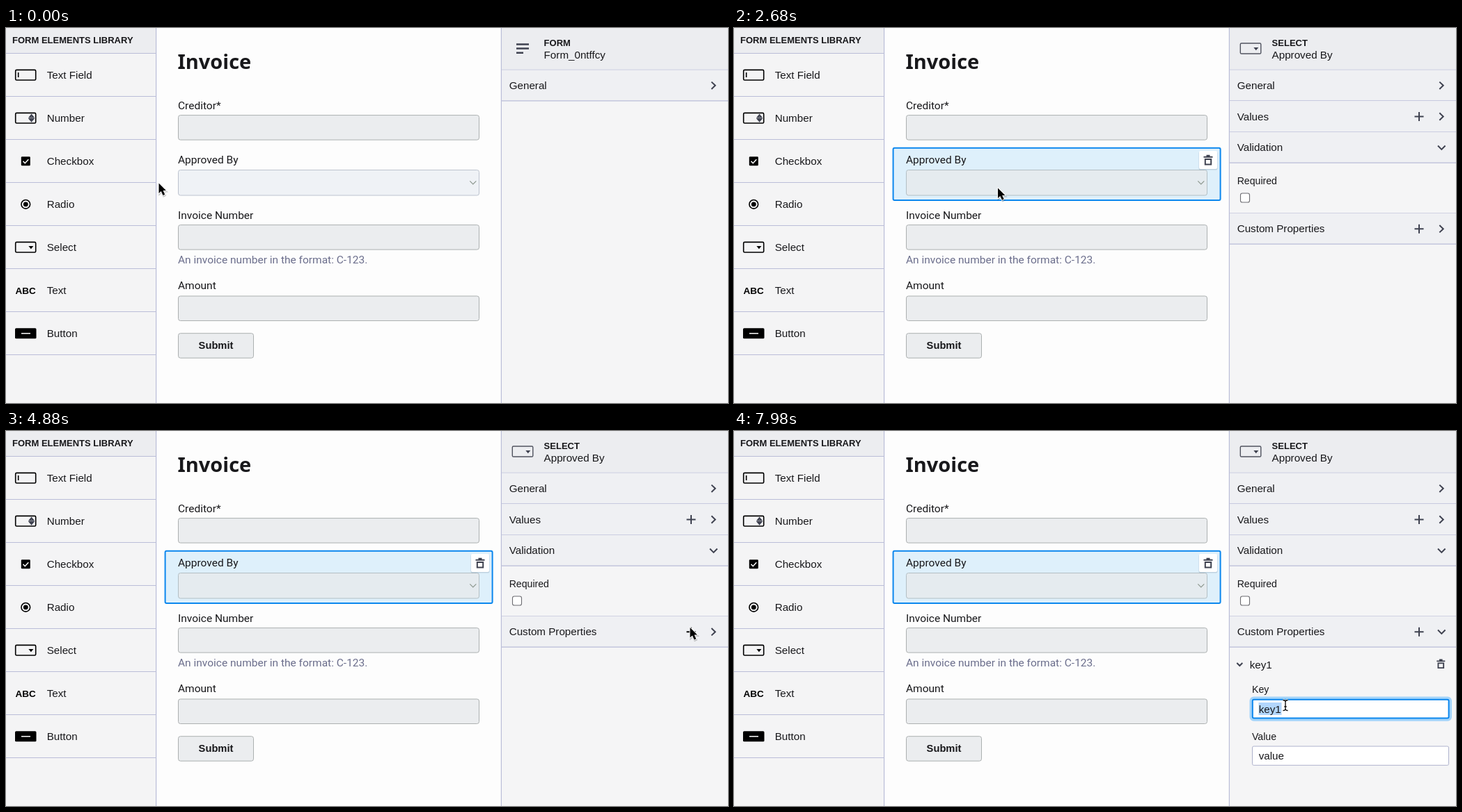
Write an HTML page that moves like this. It is 1037 px wide and 540 px high and loops after 8000 ms.

```html
<!DOCTYPE html>
<html lang="en">
<head>
<meta charset="utf-8">
<title>Form editor</title>
<style>
  html, body { margin: 0; width: 100%; height: 100%; overflow: hidden; background: #fdfdfd; }
  svg { display: block; width: 1037px; height: 540px; }
  text { font: 15.2px "Liberation Sans", Arial, sans-serif; fill: #18181b; white-space: pre; }
  .caps { font-size: 13px; font-weight: bold; }
  .small { font-size: 14.1px; }
  .label { font: 15.5px Roboto, sans-serif; }
  .help { fill: #6b6e8c; }
  .title { font: bold 29px "Noto Sans", sans-serif; }
  .submit { font-size: 14.7px; font-weight: bold; text-anchor: middle; }
  .abc { font-size: 13.5px; font-weight: bold; fill: #000; }
  .rule { stroke: #babdd8; stroke-width: 1.2; }
  .line { fill: none; stroke: #3f4250; stroke-width: 2; }
  .icon { fill: none; stroke: #000; stroke-width: 1.6; }
  .field { fill: #ebedef; stroke: #acb0b0; }
  .entry { fill: #fff; stroke: #aeb2cc; }
</style>
</head>
<body>
<svg id="stage" viewBox="0 0 1037 540"></svg>
<script>
const text = (x, y, content, cls = '') => `<text x="${x}" y="${y}" class="${cls}">${content}</text>`;
const box = (x, y, w, h, attrs = '') => `<rect x="${x}" y="${y}" width="${w}" height="${h}" ${attrs}/>`;
const path = (d, attrs = 'class="line"') => `<path d="${d}" ${attrs}/>`;
const rule = (x, y, w) => path(`M${x} ${y}h${w}`, 'class="rule"');
const group = (id, content) => `<g id="${id}">${content}</g>`;
const fill = color => `fill="${color}"`;

const right = y => path(`M1013.3 ${y - 5.2}l5.4 5.2l-5.4 5.2`);
const down = y => path(`M1011 ${y - 2.7}l5.3 5.4l5.3-5.4`);
const plus = (y, attrs) => path(`M977.5 ${y}h13M984 ${y - 6.5}v13`, attrs);
const trash = (x, y, s) => `<g transform="translate(${x} ${y}) scale(${s})">` +
  path('M-6.5-4.5h13M-2.5-6.5h5M-4.2-1.2h8.4v7.4h-8.4z') + '</g>';
const frame = y => box(13.7, y - 7.3, 29, 14.6, 'rx="1.6" class="icon"');

function section(y, name, extra) {
  return box(712, y, 325, 44.5, fill('#eff0f3')) + rule(712, y + 44.5, 325) +
    text(722.7, y + 27.7, name) + extra;
}

function library() {
  const names = ['Text Field', 'Number', 'Checkbox', 'Radio', 'Select', 'Text', 'Button'];
  const icons = [
    frame(67.7) + path('M17.7 64v7', 'class="icon"'),
    frame(129.7) + path('M34 128.4l2.6-3.2l2.6 3.2zM34 131l2.6 3.2l2.6-3.2z'),
    box(21.8, 185.3, 13, 13, 'rx="1.3"') +
      path('M24.5 191.8l2.8 2.9l5-5.4', 'fill="none" stroke="#fff" stroke-width="1.5"'),
    '<circle cx="28.3" cy="253.8" r="6.3" class="icon"/><circle cx="28.3" cy="253.8" r="3.4"/>',
    frame(315.7) + path('M32.4 314h7l-3.5 4.3z', ''),
    text(13.6, 382.6, 'ABC', 'abc'),
    box(13, 432.3, 30.5, 15, 'rx="1.6"') + path('M22 439.8h13', 'stroke="#fff" stroke-width="1.5"')
  ];
  return box(0, 0, 215, 540, fill('#f4f4f5')) + box(0, 0, 215, 36, fill('#ecedf0')) +
    text(9, 21.5, 'FORM ELEMENTS LIBRARY', 'caps') + rule(0, 36.5, 215) +
    names.map((name, i) => icons[i] + text(58.7, 73 + 62 * i, name) + rule(0, 98.5 + 62 * i, 215)).join('') +
    path('M215.6 0V540', 'class="rule"');
}

function form() {
  const field = y => box(247.5, y, 432, 35.5, 'rx="3" class="field"');
  return text(246.5, 59, 'Invoice', 'title') +
    text(247, 116.5, 'Creditor*', 'label') + field(125.6) +
    group('hover', group('tint', box(229, 173, 469, 75, fill('#def0fb'))) +
      box(228.6, 172.8, 470, 75.3, 'rx="2" fill="none" stroke="#0b87ee" stroke-width="2"')) +
    text(247, 194.5, 'Approved By', 'label') +
    box(247.5, 204.5, 432, 36.5, 'id="pick" rx="3"') +
    path('M666.3 220.3l4.5 4.6l4.5-4.6', 'fill="none" stroke="#8d978f" stroke-width="1.2"') +
    group('remove', box(667.5, 178, 27, 26.5, 'rx="2" fill="#1a3a5a" opacity=".16"') +
      box(668, 177, 26, 26, 'rx="2" fill="#fff"') + trash(681, 190.3, 1)) +
    text(247, 274.5, 'Invoice Number', 'label') + field(283.6) +
    text(247, 339.3, 'An invoice number in the format: C-123.', 'label help') +
    text(247, 376.3, 'Amount', 'label') + field(386) +
    box(247.5, 439.7, 108, 35.5, 'rx="3" class="field"') + text(301.5, 462.3, 'Submit', 'submit');
}

function properties() {
  const formHead = path('M733 23.5h18M733 29.5h18M733 35.7h10', 'class="line" style="stroke-width:2.5"') +
    text(772.6, 26, 'FORM', 'caps') + text(772.6, 43.6, 'Form_0ntffcy');
  const selectHead = box(727.3, 22, 29.5, 15, 'rx="1.6" fill="none" stroke="#50535f" stroke-width="1.4"') +
    path('M746.3 28h7l-3.5 4.2z', fill('#3f4250')) +
    text(772.6, 26, 'SELECT', 'caps') + text(772.6, 43.6, 'Approved By') +
    section(105, 'Values', plus(127.5, 'class="line"') + right(127.5)) +
    section(149.7, 'Validation', down(172.2)) +
    text(722.7, 224.8, 'Required', 'small') +
    box(727.5, 238, 13, 13, 'rx="2.6" fill="#fff" stroke="#6d6d72" stroke-width="1.1"') +
    rule(712, 266.6, 325) +
    section(266.6, 'Custom Properties', plus(289.2, 'id="add" class="line"') +
      group('closed', right(289.2)) + group('opened', down(289.2)));
  const item = path('M722.3 334l4 4l4-4') + text(740.7, 341.5, 'key1') + trash(1015.3, 335.5, .92) +
    text(744, 377, 'Key', 'small') + text(744, 444.5, 'Value', 'small') +
    box(744.5, 386.5, 282, 27.3, 'rx="2" class="entry"') +
    group('focus', box(742.5, 384.5, 286.5, 31.3, 'rx="4" fill="none" stroke="#a3d4fa" stroke-width="4"') +
      box(744.8, 386.8, 281.8, 26.8, 'rx="2" fill="#fff" stroke="#0b87ee" stroke-width="2"')) +
    box(753.5, 391, 33, 18, 'id="marked" fill="#b2d6fc"') + text(753.7, 405.6, 'key1') +
    box(744.5, 454, 282, 27.3, 'rx="2" class="entry"') + text(753.7, 473.2, 'value');
  return box(712, 0, 325, 540, fill('#f5f5f6')) + box(712, 0, 325, 60, fill('#ecedf0')) +
    rule(712, 60.4, 325) + section(60.4, 'General', right(82.8)) +
    group('formHead', formHead) + group('selectHead', selectHead) + group('item', item) +
    path('M711.4 0V540', 'class="rule"');
}

const arrow = 'M0 0V14.6L3.3 11.5L6 17.4L8.7 16.2L6.1 10.5H10.4Z';
const beam = 'M-3.5-7.5Q0-7.5 0-5Q0-7.5 3.5-7.5M0-5V5M-3.5 7.5Q0 7.5 0 5Q0 7.5 3.5 7.5M-1.8 1.8h3.6';
const cursors = group('arrow', path(arrow, 'transform="translate(.7 1.5)" opacity=".2" stroke="#000" stroke-width="2"') +
    path(arrow, 'fill="#000" stroke="#fff" stroke-width="1.8" paint-order="stroke" stroke-linejoin="round"')) +
  group('beam', path(beam, 'fill="none" stroke="#fff" stroke-width="2.8"') +
    path(beam, 'fill="none" stroke="#000" stroke-width="1.3"'));

document.getElementById('stage').innerHTML = library() + form() + properties() + cursors;

const part = id => document.getElementById(id);
const show = (id, on) => { part(id).style.display = on ? '' : 'none'; };

// time, x, y of the pointer
const moves = [
  [0, 219.5, 223.5], [80, 219.5, 223.5], [720, 283.5, 227.5], [1000, 283.5, 227.5], [1160, 285, 227.5],
  [2460, 285, 227.5], [3240, 766, 242.3], [3900, 766, 242.3], [4640, 982.5, 283],
  [5860, 982.5, 283], [6640, 792, 395], [8000, 792, 395]
];

function pointer(t) {
  const next = Math.max(1, moves.findIndex(m => m[0] > t));
  const [t0, x0, y0] = moves[next - 1], [t1, x1, y1] = moves[next];
  const p = (t - t0) / (t1 - t0), e = p * p * (3 - 2 * p);
  return [x0 + (x1 - x0) * e, y0 + (y1 - y0) * e];
}

function draw(now) {
  const t = now % 8000, [x, y] = pointer(t);
  const selected = t >= 1260, added = t >= 5360;
  const overKey = added && x > 744 && x < 1027 && y > 386 && y < 414;
  const overAdd = x > 974 && x < 994 && y > 278 && y < 301;

  show('hover', selected || x >= 228);
  show('tint', selected);
  show('remove', selected);
  part('pick').setAttribute('fill', selected ? '#e5ebef' : '#eff2f6');
  part('pick').setAttribute('stroke', selected ? '#b3bfc4' : '#bcc3ce');
  show('formHead', !selected);
  show('selectHead', selected);
  show('closed', !added);
  show('opened', added);
  show('item', added);
  show('focus', t >= 7180);
  show('marked', t >= 7300);
  part('add').style.stroke = overAdd ? '#000' : '';
  show('arrow', !overKey);
  show('beam', overKey);
  part(overKey ? 'beam' : 'arrow').setAttribute('transform', `translate(${x.toFixed(1)} ${y.toFixed(1)})`);
}

const start = performance.now();
function tick() {
  draw(performance.now() - start);
  requestAnimationFrame(tick);
}
tick();
</script>
</body>
</html>
```
